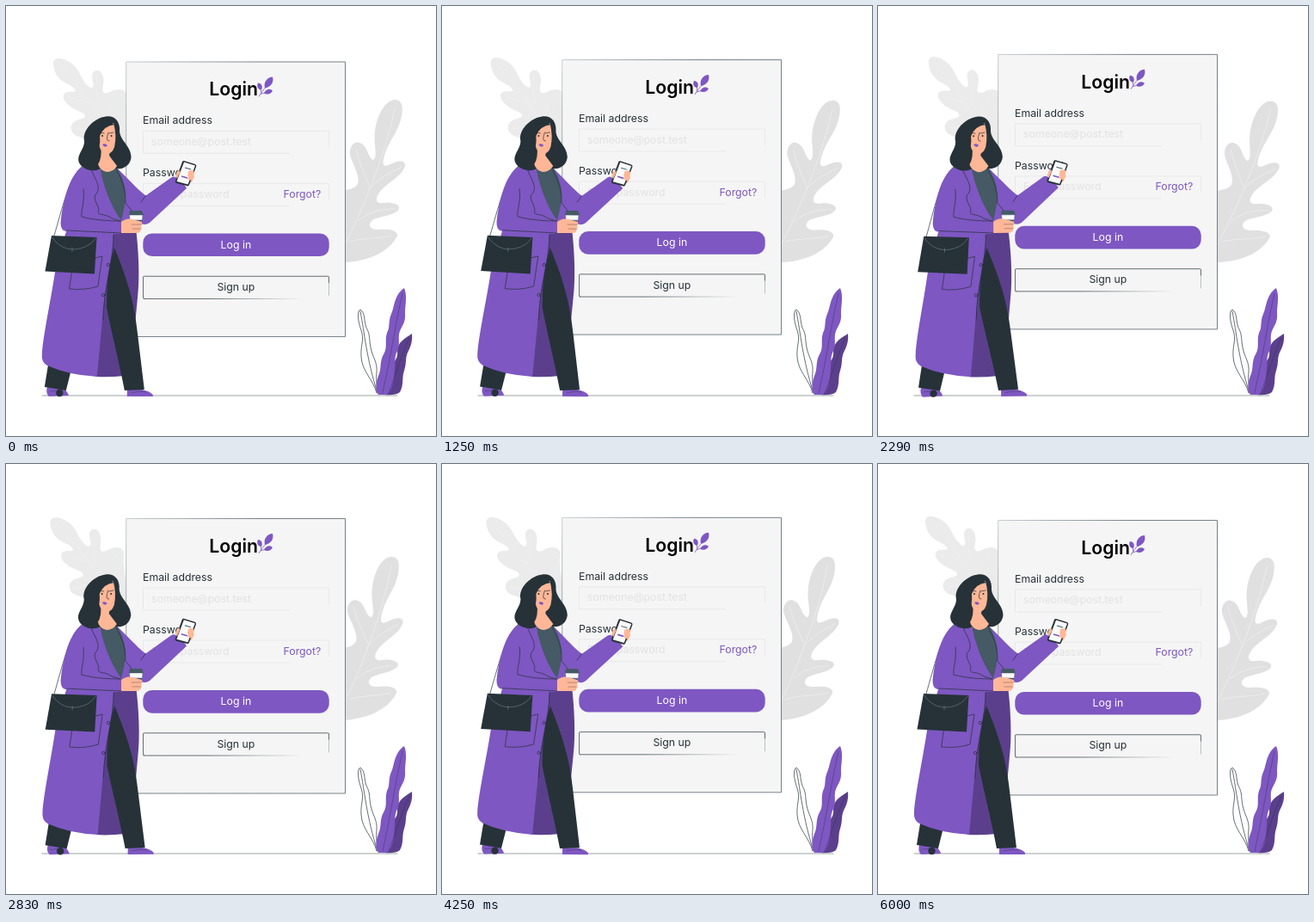
An HTML page for the animation above (6.04 s loop, 500x500 px).

```html
<!DOCTYPE html>
<html lang="en">
<head>
<meta charset="utf-8">
<title>Login</title>
<style>
html, body { margin: 0; width: 100%; height: 100%; overflow: hidden; background: #fff; }
svg { display: block; width: 100%; height: 100%; }
text { font: 12.3px Inter, "Open Sans", sans-serif; fill: #263238; }
.title { font-size: 21.2px; font-weight: 600; fill: #000; }
.hint { fill: #e2e2e2; }
.mid { text-anchor: middle; }
.purple { fill: #7e57c2; }
.deep { fill: #5b3f8c; }
.dark { fill: #263238; }
.slate { fill: #455a64; }
.skin { fill: #ffb797; }
.line { fill: none; stroke: #263238; stroke-width: .7; stroke-linecap: round; stroke-linejoin: round; }
.field { fill: none; stroke: #e6e6e6; stroke-width: .8; }
.vein { fill: none; stroke: #f0f0f0; stroke-width: .7; }
</style>
</head>
<body>
<svg viewBox="0 0 500 500">
  <defs>
    <linearGradient id="fade" gradientUnits="userSpaceOnUse" x1="160" y1="0" x2="345" y2="0">
      <stop offset=".4" stop-color="#263238"/>
      <stop offset="1" stop-color="#263238" stop-opacity="0"/>
    </linearGradient>
    <linearGradient id="edge" gradientUnits="userSpaceOnUse" x1="140" y1="66" x2="240" y2="140">
      <stop offset="0" stop-color="#c4c8ca"/>
      <stop offset="1" stop-color="#66737a"/>
    </linearGradient>
  </defs>

  <g id="leftLeaf">
    <path fill="#ebebeb" d="M55 68C54 59 64 59 72 64C82 69 85 78 89 85C93 92 99 97 101 94C103 89 98 83 101 78C104 72 112 75 113 83C115 91 110 97 114 101C119 103 122 97 131 97C140 97 142 104 139 112L145 175L110 170C104 155 92 155 82 151C73 146 74 136 82 133C87 131 92 131 92 128C92 124 85 123 80 120C72 116 65 109 67 103C70 98 78 101 81 99C80 95 76 93 70 90C62 86 56 79 55 68Z"/>
    <path class="vein" d="M62 67C80 92 105 110 126 165M106 81C104 92 106 104 107 114M137 102C126 108 120 116 117 132M72 106C85 109 95 111 106 116M80 143C95 141 106 141 118 147"/>
  </g>
  <g id="rightLeaf">
    <path fill="#e0e0e0" d="M452 109C461 109 462 118 460 128C457 144 447 155 442 168C437 182 437 188 445 185C454 180 465 178 464 186C460 199 443 205 434 217C428 226 431 230 439 229C447 228 459 230 457 236C452 244 435 244 426 249C420 254 423 260 432 260C443 259 455 260 455 267C448 282 428 296 395 298L385 300L382 220C393 212 404 215 409 207C412 196 403 185 400 173C399 163 405 157 411 159C421 162 420 176 427 179C433 176 427 160 429 146C431 130 439 110 452 109Z"/>
    <path class="vein" d="M452 119C443 165 421 225 388 290M407 166C411 184 417 195 423 210M460 187C446 195 432 200 422 214M452 236C436 236 423 239 409 250M449 267C433 271 417 269 399 274"/>
  </g>
  <path class="line" stroke-opacity=".65" d="M42 453H455"/>

  <g id="panel">
    <path fill="#f5f5f5" stroke="url(#edge)" stroke-width=".9" d="M139.7 65.5H394.5V385H139.7Z"/>
    <text class="title" x="236.3" y="104.8">Login</text>
    <g class="purple">
      <path d="M301 96C299 89 304 83 310 83C312 90 307 95 301 96Z"/>
      <path d="M293 90C297 90 299 94 297 98C293 98 291 94 293 90Z"/>
      <path d="M300 102C302 97 307 96 310 99C308 103 304 104 300 102Z"/>
      <path fill="none" stroke="#7e57c2" stroke-width=".8" d="M294 106C296 102 299 98 303 94M296 97L297 102M296 103L302 101"/>
    </g>
    <text x="159" y="138">Email address</text>
    <path class="field" d="M159.5 172V146H375.5V165M159.5 172H330"/>
    <text class="hint" x="169" y="162.5">someone@post.test</text>
    <text x="159" y="199">Password</text>
    <path class="field" d="M159.5 233V207H375.5V226M159.5 233H330"/>
    <text class="hint" x="169" y="223.5">Enter password</text>
    <text class="purple" x="322.5" y="223.5">Forgot?</text>
    <rect class="purple" x="159.3" y="265" width="216.4" height="26.6" rx="10.5"/>
    <text class="mid" x="267.4" y="282.3" style="fill:#fff">Log in</text>
    <path class="line" d="M375.5 322V315.8Q375.5 314.8 374.5 314.8H160.5Q159.5 314.8 159.5 315.8V340Q159.5 341 160.5 341"/>
    <path class="line" stroke-opacity=".4" d="M375.5 322V337"/>
    <path class="line" style="stroke:url(#fade)" d="M160.5 341H345"/>
    <text class="mid" x="267.4" y="331.5">Sign up</text>
  </g>

  <g id="plant">
    <path class="line" d="M431 450C427 434 414 425 413 408C412 394 417 389 413 377C409 366 408 355 412 353C418 357 416 366 419 374C424 383 422 388 424 397C426 408 432 414 431 425C430 434 431 441 433 450M412 355C417 380 419 410 432 450"/>
    <path class="deep" d="M472 381C473 391 470 397 467 403C464 410 466 415 463 424C460 432 463 440 458 449Q453 453 440 452C444 438 450 432 450 422C450 411 456 412 455 402C455 391 463 387 472 381Z"/>
    <path class="purple" d="M463 328C467 337 464 348 464 357C465 367 461 371 458 378C455 385 459 393 455 401C451 409 453 415 452 422C451 433 451 445 443 452L433 452C429 446 430 438 433 430C437 422 434 414 439 405C444 397 440 390 443 380C447 373 444 367 448 358C452 350 451 336 463 328Z"/>
    <path class="line" stroke-opacity=".55" d="M461 334C452 372 447 412 438 450M469 386C458 410 453 430 445 450"/>
  </g>

  <g id="woman">
    <path class="line" d="M89 186C73 199 65 237 56 267"/>
    <path class="deep" d="M124 255L151 258C154 282 156 315 153 340L150 372L138 430Q120 432 104 431L112 340Z"/>
    <path class="purple" d="M48 443L69 446Q73 451 73 453L50 454Q46 450 48 443ZM141 446L158 446Q168 448 171 452L171 454L141 454Z"/>
    <path class="line" stroke-opacity=".5" d="M51 448L65 447M146 450Q156 447 163 449"/>
    <circle class="dark" cx="62.5" cy="450" r="4.2"/>
    <path class="dark" d="M50 412L76 423L70 447L45 443ZM126 281C138 310 149 340 153 380L161 446L138 447C132 415 124 385 117 350Q117 310 126 281Z"/>
    <path class="purple" d="M126 186C139 197 152 213 162.500 220.500L190 201Q194 197 197 199Q205 203 210 212L167 252Q160 257 153 250L154 263L128 262L122 240Z"/>
    <path class="slate" d="M108 184L127 185Q138 201 139 218Q139 232 134 249L120 248Z"/>
    <path class="purple" d="M92 185Q99 183 109 188C113 208 121 231 133 248L134 265L125 265C125 290 117 315 114 345L106 431Q72 429 48 418Q41 414 42 405C43 385 52 343 57 310L70 262Q62 261 64 247C67 225 74 193 92 185Z"/>
    <path class="line" d="M99 190C103 201 110 208 106 217C99 223 107 230 108 237C105 245 114 240 123 247L133 250M90 213C92 226 87 237 88 245C102 249 120 250 133 250M71 261L134 264M125 266C126 292 113 330 113 365M128 190Q140 210 139 228M138 228Q148 240 154 248M162.500 220.500L157 228M79 295Q94 296 112 291L107 326Q91 331 74 329Z"/>
    <g class="line"><circle cx="119" cy="301" r="1.7"/><circle cx="113" cy="336" r="1.7"/></g>

    <path class="dark" d="M53 267L105.500 269L103 311.500L45.500 308.500Z"/>
    <path fill="none" stroke="#75828a" stroke-width=".6" d="M54 269C60 279 70 283 78 283C90 283 100 277 104 270M77 281V286"/>

    <path class="dark" d="M116 128.500C127 127 133 135 132 146C133 157 145.500 163 145.500 176C144 187 134 192 123 188L112 187C106 194 92 192 86 184C80 174 91 168 91 157C88 144 103 130 116 128.500Z"/>
    <path class="skin" d="M110 162L121 166L120 174L129 186Q125 193 117 193Q109 191 107 184Q112 176 110 162Z"/>
    <path class="skin" d="M108 141Q116 142 125 136Q129 151 126 164Q123 173 115 172Q108 169 107 154Z"/>
    <path class="dark" d="M105 134Q116 130 126 138Q114 139 109 151Q110 163 106 169Q99 152 105 134Z"/>
    <path class="line" d="M119 147Q115 158 120 157M109 147L114 148M120 148L125 147"/>
    <g class="dark"><circle cx="112" cy="151" r="1"/><circle cx="122.5" cy="151" r="1"/></g>
    <path class="purple" d="M112 161Q115 159 118 162Q115 166 112 161Z"/>

    <path class="slate" d="M144 238H158L160 243H143ZM145 248H158L156 262H146Z"/>
    <path fill="#fafafa" stroke="#455a64" stroke-width=".5" d="M143.5 243H159L158.5 249H144Z"/>
    <path class="skin" d="M134 251Q140 246 147 248L158 251Q159 254 157 256Q159 259 156 261Q156 264 152 264L134 264Z"/>
    <path class="line" stroke-opacity=".5" d="M146 254H157M147 259H156"/>

    <path class="skin" d="M197 198Q198 192 203 189L216 191Q220 192 218 196Q220 199 217 202Q217 206 212 206L208 209Z"/>
    <path class="dark" d="M207 180L220 184Q222 185 221 187L213 208Q212 210 210 209L198 206Q196 205 197 203L205 181Q205 180 207 180Z"/>
    <path fill="#fafafa" d="M207 181.500L220 185.500L211.500 207.500L198.500 204Z"/>
    <path stroke="#455a64" stroke-width="1" d="M208 188L215 190"/>
    <path stroke="#7e57c2" stroke-width="1.6" d="M204 198L211 200"/>
    <path class="skin" d="M212 192L217 191Q220 193 218 196Q219 199 217 201Q215 204 211 201Q213 199 211 197Q212 194 212 192ZM198 198Q199 193 202 191Q203 194 201 196L199 201Z"/>
  </g>
</svg>
<script>
const LOOP = 6040, LEAD = 40;
const FLOAT = LOOP / 4, SWAY = LOOP / 2;
const GUST = { start: 762, period: 1250, cycles: 3.5 };
const part = id => document.getElementById(id);
const wave = x => Math.sin(2 * Math.PI * x);
const turn = (id, deg, x, y) => part(id).setAttribute("transform", `rotate(${deg} ${x} ${y})`);

function draw(now) {
  const t = (now + LEAD) % LOOP;

  // The card bobs at constant speed, up then down.
  const lift = 10 * (1 - Math.abs(1 - 2 * (t % FLOAT) / FLOAT));
  part("panel").setAttribute("transform", `translate(0 ${-lift})`);

  turn("woman", 0.58 * wave(t / SWAY), 130, 240);

  // The grey leaves rest outside the gust.
  const g = (t - GUST.start) / GUST.period;
  const bend = g > 0 && g < GUST.cycles ? 1.35 * wave(g) : 0;
  turn("leftLeaf", bend, 130, 230);
  turn("rightLeaf", bend, 390, 300);

  requestAnimationFrame(() => draw(performance.now()));
}
draw(performance.now());
</script>
</body>
</html>
```
